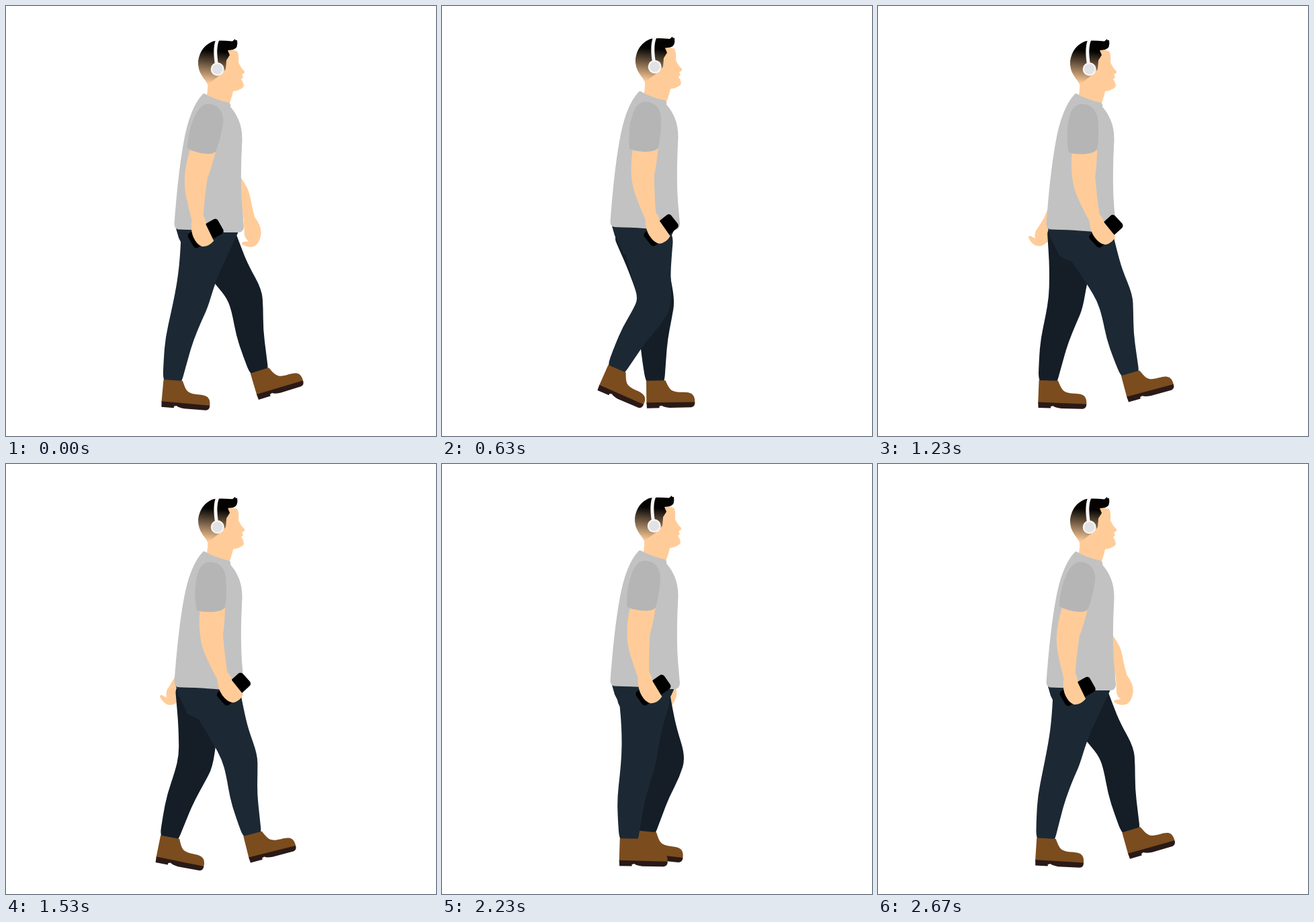
An HTML page for the animation above (2730 ms loop, 640 px wide and 640 px high).

```html
<!DOCTYPE html>
<html lang="en">
<head>
<meta charset="utf-8">
<title>Walking with headphones</title>
<style>
  html, body { margin: 0; width: 100%; height: 100%; overflow: hidden; background: #fff; }
  svg { display: block; width: 100%; height: 100%; }
</style>
</head>
<body>
<svg viewBox="0 0 640 640">
  <defs>
    <linearGradient id="fade" gradientUnits="userSpaceOnUse" x1="312" y1="67" x2="307" y2="116">
      <stop stop-color="#040302"/>
      <stop offset="1" stop-color="#fc9"/>
    </linearGradient>
    <g id="shoe">
      <path fill="#7b4c1e" d="M-14 0 H14.5 C18 8 20 13 25 16 C33 20 44 17 51 20 C56 22 58 27 57.5 34.5 L-14.5 33.5Z"/>
      <path fill="#2a1a17" d="M-14.5 32.5 L57.5 33.5 Q58 40 52 41 H20 Q11 40 8 37.5 L4.5 38.5 V41 H-14Z"/>
    </g>
  </defs>

  <path id="farArm" fill="#fc9" d="M335 240 L350 256 Q361 270 364 286 Q368 308 371 315 Q380 327 380 338 Q378 353 371 357 Q363 361 352 355 Q350 351 355 351 L361 350 Q354 344 355 335 L354 318 Q350 300 348 285Z"/>
  <g id="farLeg" fill="#151e27"><path/><use href="#shoe"/></g>
  <g id="nearLeg" fill="#1c2934"><path/><use href="#shoe"/></g>
  <path id="pelvis" fill="#1c2934" d="M253 322 V331 L257 345 L264 359 L270 372 Q310 395 330 370 L345 338 V322Z"/>

  <g id="head">
    <path fill="#fc9" d="M296 90 L320 62 L344 67 Q347 72 346 84 Q350 93 355 97 Q356 100 351 102 L353 106 L350 109 L352 112 Q355 119 353 121 Q347 126 338 127 Q336 137 330 152 L296 145 Q301 128 300 115Z"/>
    <path fill="url(#fade)" d="M300 117 Q298 112 293 106 Q285 95 286 82 Q289 61 307 53 Q315 50.500 337 52.500 L341 49 L341.500 51 L344 51 Q346 63 338 65 L330 66 L333 73 L328 81 L327 94 L317 104Z"/>
    <path fill="none" stroke="#f7f7f7" stroke-width="5" d="M315 50 Q309.500 62 313.500 87"/>
    <circle cx="314.700" cy="94" r="10" fill="#f7f7f7"/>
    <circle cx="314.700" cy="94" r="7.700" fill="#e2e2e4"/>
  </g>

  <path id="shirt" fill="#c2c2c2" d="M293 131 Q295 129 300 133 Q314 140 332 144 Q335 146 334 150 C345 163 352 178 351.500 200 Q348 265 352 305 L354 328 Q354 337 345 337 H325 Q310 334 257 332.500 Q250.500 332 250.500 324 Q256 250 264 205 Q273 152 293 131Z"/>

  <g id="nearArm">
    <rect x="299" y="321.500" width="51" height="25" rx="5" transform="rotate(-38 324.500 334)"/>
    <path fill="#fc9" d="M284 200 L283 216 Q279 240 282 262 Q284 275 290 290 Q296 306 301 317 Q301 332 307 342 Q314 353 322 354 Q332 353 338 343 L323 321 Q322 314 317 308 Q315 285 315 252 Q319 235 322 205Z"/>
    <path fill="#b5b5b5" d="M303 142.500 C318 142.500 326 155 326 168 Q326 190 321.500 211 Q318 217 301 217 Q283 216 278.500 212 Q276 182 284 160 Q290 142.500 303 142.500Z"/>
  </g>
</svg>
<script>
const LOOP = 2730, RAD = Math.PI / 180;
const KNEE = [6, 123], SHIN = 109;
// Trouser outline of a straight leg, seen from the hip
const TROUSERS = [
  [0, -15], [-46, 8], [-38, 36], [-31, 60], [-25, 85], [-20, 112], [-18, 140], [-17, 175],
  [-12, 205], [-4, 242], [22, 242], [23, 205], [24, 173], [29, 140], [33, 118], [31, 79], [33, 50], [37, 10]
];

const get = id => document.getElementById(id);
const cos = degrees => Math.cos(degrees * RAD);
const pulse = (degrees, sharpness) => ((1 + cos(degrees)) / 2) ** sharpness;
const mix = (a, b, w) => a + (b - a) * w;

function turn([x, y], degrees) {
  const c = cos(degrees), s = Math.sin(degrees * RAD);
  return [x * c - y * s, x * s + y * c];
}

function place(el, x, y, angle = 0, cx = 0, cy = 0) {
  el.setAttribute('transform', `translate(${x} ${y}) rotate(${angle} ${cx} ${cy})`);
}

// Closed curve that uses the points as control points
function smooth(points) {
  const curves = points.map((p, i) => {
    const q = points[(i + 1) % points.length];
    return `${p} ${mix(p[0], q[0], 0.5)},${mix(p[1], q[1], 0.5)}`;
  });
  return `M${curves.at(-1).split(' ')[1]}Q${curves.join(' ')}Z`;
}

// The thigh swings like a pendulum, the ankle follows the step, the shin joins them
function drawLeg(leg, hipX, hipY, phase, lean) {
  const thigh = 19.6 * cos(phase + 9) + lean;
  const heelOff = pulse(phase - 78, 7), heelStrike = pulse(phase - 178, 17);
  const ankleX = 300 - 68.7 * cos(phase - 11) + 14 * cos(2 * phase + 27) + 5.4 * cos(3 * phase - 50);
  const ankleY = 557.5 - 18 * heelOff - 15 * heelStrike;
  const foot = 1 + 29 * pulse(phase - 62, 7) - 18.5 * pulse(phase - 180, 4);

  const knee = turn(KNEE, thigh);
  const dx = ankleX - hipX - knee[0], dy = ankleY - hipY - knee[1];
  const shin = 1.6 - Math.atan2(dx, dy) / RAD;
  const stretch = Math.hypot(dx, dy) / SHIN;

  const outline = TROUSERS.map(([x, y]) => {
    const upper = turn([x, y], thigh);
    const lower = turn([x - KNEE[0], (y - KNEE[1]) * stretch], shin);
    const bend = Math.min(1, Math.max(0, (y - 105) / 35));
    return [hipX + mix(upper[0], knee[0] + lower[0], bend), hipY + mix(upper[1], knee[1] + lower[1], bend)];
  });
  leg.children[0].setAttribute('d', smooth(outline));
  place(leg.children[1], ankleX, ankleY, foot);
}

function draw() {
  const phase = performance.now() % LOOP / LOOP * 360;
  const lift = -3.6 * pulse(2 * phase - 165, 2);
  const armPhase = phase + 5;
  drawLeg(get('nearLeg'), 308, 328 + lift, phase, 0);
  drawLeg(get('farLeg'), 298, 328 + lift, phase + 175, -6.5);
  place(get('pelvis'), 0, lift);
  place(get('shirt'), 0, lift);
  place(get('head'), -0.55 * lift, lift);
  place(get('farArm'), 0, lift, 18 * (1 - cos(armPhase)), 304, 150);
  place(get('nearArm'), 0, lift + 3.5, 0.6 + 6.6 * cos(armPhase) + 1.3 * cos(2 * armPhase), 304, 150);
  requestAnimationFrame(draw);
}
draw();
</script>
</body>
</html>
```
